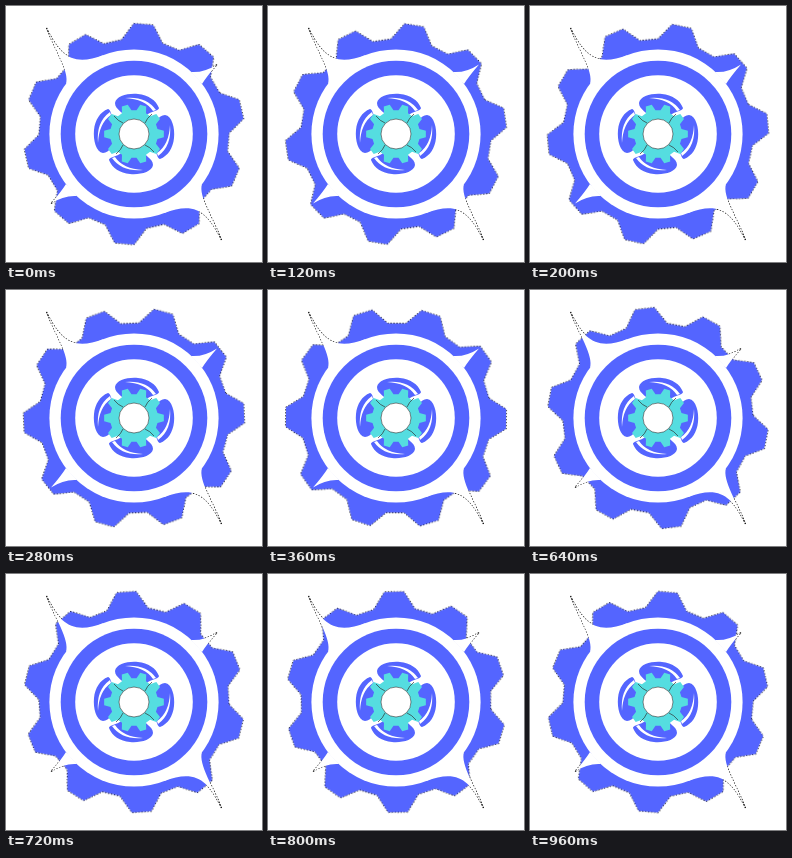
Animation of 256x256 px, one loop 1 s. Source, as an HTML page:

```html
<!DOCTYPE html>
<html lang="en">
<head>
<meta charset="utf-8">
<title>Gear</title>
<style>
  html, body { margin: 0; width: 100%; height: 100%; overflow: hidden; background: #fff; }
  svg { display: block; width: 100vw; height: 100vh; }
  .blue { fill: #5465ff; }
  .teal { fill: #55dde0; }
  .white { fill: #fff; }
  .fringe { fill: none; stroke: #000; stroke-width: 1.2; stroke-dasharray: 1.4 1.6; }
  .seam { fill: none; stroke: #333; stroke-width: .7; }
  /* ten teeth: one tooth pitch per loop, first and last poses alike */
  #wheel { animation: turn 1s steps(25, jump-none) infinite; }
  @keyframes turn {
    from { transform: rotate(-13deg); }
    to { transform: rotate(23deg); }
  }
</style>
</head>
<body>
<svg viewBox="-128 -128 256 256">
  <defs>
    <path id="pair" d="M-87.5 -106 C-73 -76 -60 -68 -30 -79 L-68 -50 C-64 -62 -80 -86 -87.5 -106Z
      M83 -69.5 Q70 -61 57 -62 L68 -50 Q73 -58 83 -69.5Z"/>
    <g id="spikes">
      <use href="#pair"/>
      <use href="#pair" transform="rotate(180)"/>
    </g>
    <g id="blade">
      <path class="blue" d="M-6 -14 C-10 -22 -19 -24 -19 -31 C-18 -38 -6 -41 4 -40 C14 -39 22 -34 25 -26 C24 -22 16 -24 7 -14Z"/>
      <path class="white" d="M-9 -36 Q12 -38 22 -24 L19 -23 Q11 -35 -9 -36Z"/>
    </g>
    <path id="seam" class="seam" d="M11 -11 Q13 -16 18 -20"/>
  </defs>
  <use href="#spikes" class="fringe"/>
  <g id="wheel">
    <path class="fringe"/>
    <path class="blue"/>
  </g>
  <use href="#spikes" class="white"/>
  <circle class="white" r="84.6"/>
  <circle class="blue" r="73.3"/>
  <circle class="white" r="58.8"/>
  <use href="#blade"/>
  <use href="#blade" transform="rotate(90)"/>
  <use href="#blade" transform="rotate(180)"/>
  <use href="#blade" transform="rotate(270)"/>
  <path id="cog" class="teal"/>
  <use href="#seam"/>
  <use href="#seam" transform="rotate(90)"/>
  <use href="#seam" transform="rotate(180)"/>
  <use href="#seam" transform="rotate(270)"/>
  <circle class="white" r="15" stroke="#333" stroke-width=".6"/>
</svg>
<script>
  function gear(teeth, tip, root, tipHalf, rootHalf) {
    const corners = [[root, -rootHalf], [tip, -tipHalf], [tip, tipHalf], [root, rootHalf]];
    const points = [];
    for (let i = 0; i < teeth; i++) {
      for (const [r, offset] of corners) {
        const a = (i * 360 / teeth + offset) * Math.PI / 180;
        points.push((r * Math.cos(a)).toFixed(2) + ' ' + (r * Math.sin(a)).toFixed(2));
      }
    }
    return 'M' + points.join('L') + 'Z';
  }

  const wheel = gear(10, 110.5, 95, 5, 12.5);
  for (const path of document.querySelectorAll('#wheel path')) path.setAttribute('d', wheel);
  document.getElementById('cog').setAttribute('d', gear(10, 30, 24, 6, 12));
</script>
</body>
</html>
```
